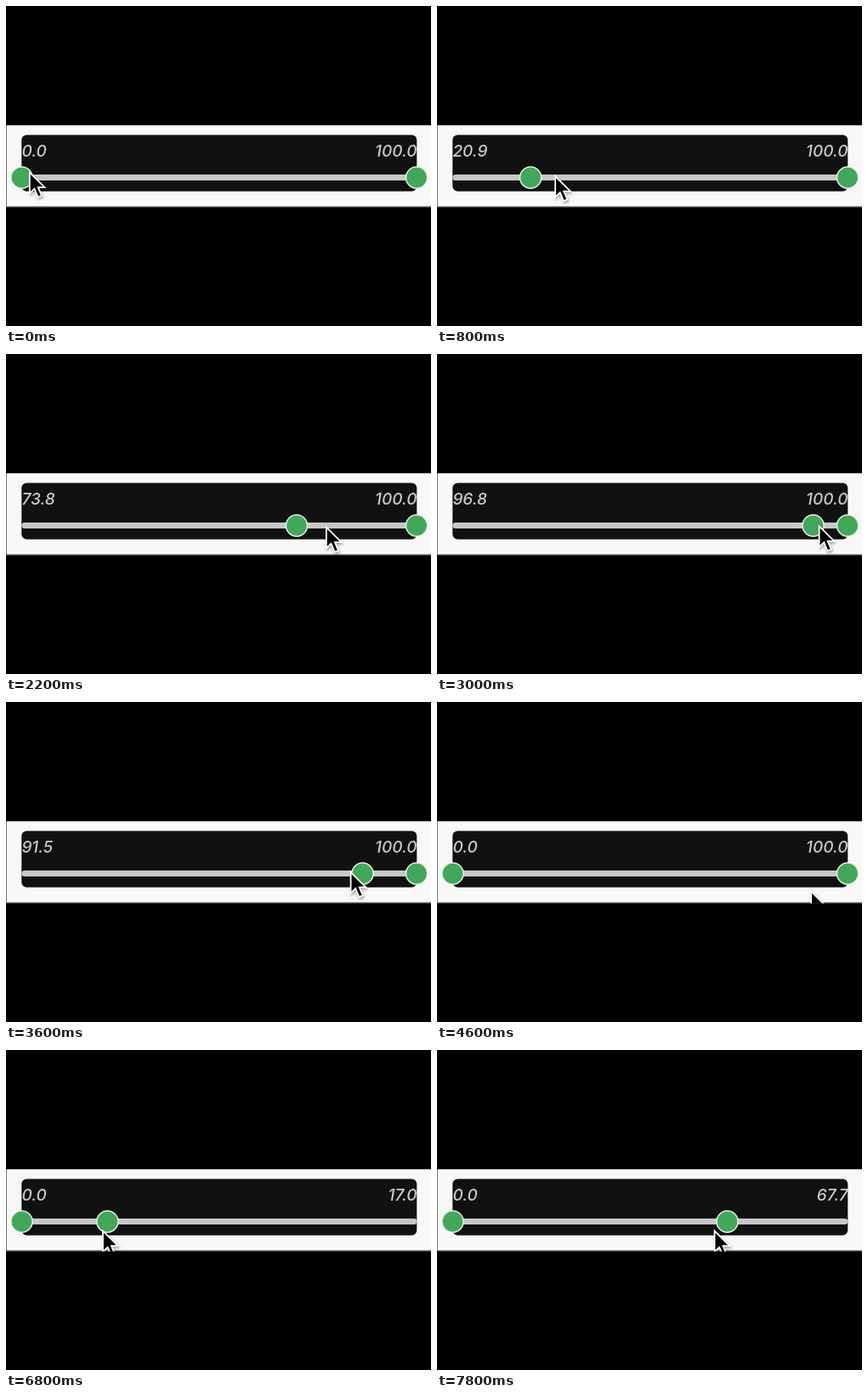
An HTML page for the animation above (8 s loop, 500x376 px).

```html
<!DOCTYPE html>
<html lang="en">
<head>
<meta charset="utf-8">
<title>Range slider</title>
<style>
  html, body { margin: 0; width: 100%; height: 100%; overflow: hidden; background: #000; }
  svg { display: block; width: 100%; height: 100%; }
  text { font: italic 500 19px Inter, sans-serif; fill: #cacaca; }
  .thumb { fill: #42a75a; stroke: #e4f2e4; stroke-width: 1.5; }
  #cursor { filter: drop-shadow(1px 2px 1.5px rgba(0, 0, 0, .35)); }
</style>
</head>
<body>
<svg viewBox="0 0 500 376">
  <clipPath id="window"><rect y="140" width="500" height="96.5"/></clipPath>
  <rect width="500" height="376"/>
  <rect y="140" width="500" height="96.5" fill="#777"/>
  <rect x="1" y="140.3" width="499" height="94.9" fill="#f8f8f7"/>
  <rect x="18.3" y="151.6" width="465" height="66.2" rx="6" fill="#111"/>
  <text id="lowText" x="18.4" y="176.5"></text>
  <text id="highText" x="483.5" y="176.5" text-anchor="end"></text>
  <rect x="18.3" y="197.9" width="465" height="7" rx="3.5" fill="#c8c6c7"/>
  <circle id="lowThumb" class="thumb" cy="201.6" r="12.6"/>
  <circle id="highThumb" class="thumb" cy="201.6" r="12.6"/>
  <g clip-path="url(#window)">
    <path id="cursor" d="M0 .7V25.2L5.6 19.7 9.8 29.7 14.2 27.9 10 18.2H17.7Z"
          stroke="#fff" stroke-width="1.8"/>
  </g>
</svg>
<script>
  const LOOP = 8000, STEP = 200, SCALE = 4.383;
  const LEAD = 0.12;    // steps by which the cursor runs ahead of the thumb
  const SWITCH = 21;    // step at which the second thumb takes over
  const $ = id => document.getElementById(id);

  // Each drag has turning points [step, value]; grab is the cursor's offset from the thumb.
  const low = { zero: 18.5, grab: 8, keys: [[0, 0], [2, 5], [4, 20.9], [6, 101], [10, 42],
    [11, 73.8], [12, 125], [13, 98.5], [14, 98.5], [18, 91.5], [20, 8], [21, 0]] };
  const high = { zero: 44.8, grab: -15, keys: [[24, 100], [25, 99], [27, 80], [29, 34.7],
    [30, 1], [31, -7], [32, -7], [34, 17], [37, 72], [39, 67.7]] };

  const clamp = (v, min, max) => Math.max(min, Math.min(max, v));

  function sample(keys, t) {
    const i = keys.findIndex(k => k[0] >= t);
    if (i < 0) return keys[keys.length - 1][1];
    if (i === 0) return keys[0][1];
    const [t0, a] = keys[i - 1], [t1, b] = keys[i];
    return a + (b - a) * (t - t0) / (t1 - t0);
  }

  function place(name, { zero, keys }, t) {
    const value = clamp(sample(keys, t), 0, 100);
    $(name + "Thumb").setAttribute("cx", zero + value * SCALE);
    $(name + "Text").textContent = value.toFixed(1);
  }

  function cursorAt(t) {
    const drag = t < SWITCH ? low : high;
    const x = drag.zero + drag.grab + sample(drag.keys, t + LEAD) * SCALE;
    if (drag === low) return [clamp(x, 0, 476), 195 + 8 * Math.sin(Math.PI * t / 22)];
    const away = Math.max(0, 24 - t);   // rises from below towards the second thumb
    return [clamp(x, 0, 476) - 28 * away, 212 + 10 * away ** 2];
  }

  function draw(now) {
    const t = Math.floor(now % LOOP / STEP);
    place("low", low, t);
    place("high", high, t);
    $("cursor").setAttribute("transform", `translate(${cursorAt(t)})`);
  }

  let start;
  function tick(now) {
    start ??= now;
    draw(now - start);
    requestAnimationFrame(tick);
  }
  draw(0);
  requestAnimationFrame(tick);
</script>
</body>
</html>
```
